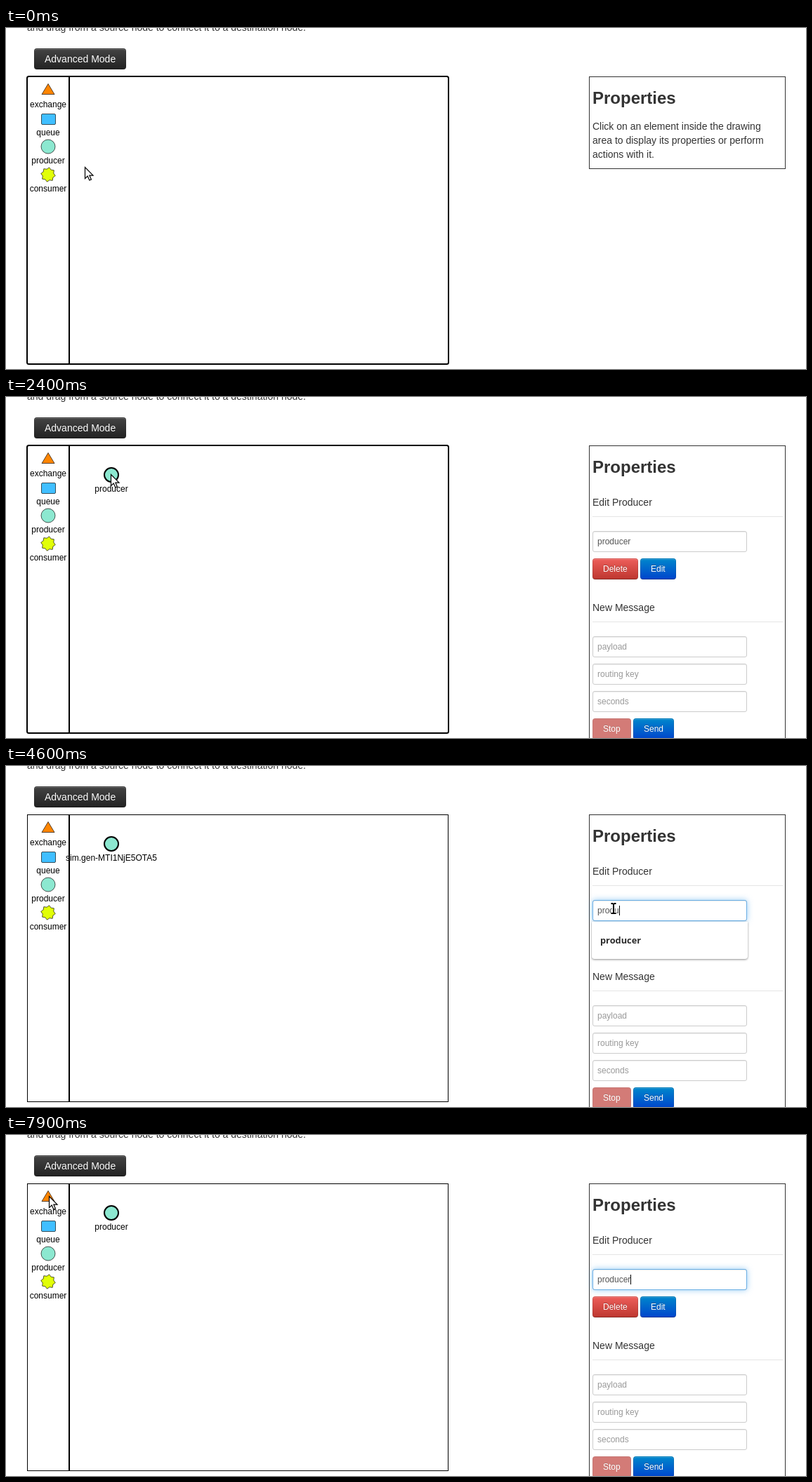
Write an HTML page that moves like this. It is 1139x486 px and loops after 8000 ms.

```html
<!DOCTYPE html>
<html lang="en">
<head>
<meta charset="utf-8">
<title>Message simulator</title>
<style>
html, body { margin: 0; width: 100%; height: 100%; overflow: hidden; background: #fff; }
#stage {
  position: relative; width: 1139px; height: 486px; overflow: hidden;
  font: 14px/20px "Liberation Sans", Arial, sans-serif; color: #333;
}
#stage > *, .panel > * { position: absolute; box-sizing: border-box; white-space: nowrap; }
svg { left: 0; top: 0; overflow: visible; }
svg text { font-size: 12px; text-anchor: middle; fill: #000; }
.panel { left: 830px; top: 69px; width: 280px; border: 1px solid #333; }
.panel > * { left: 4px; margin: 0; }
h3 { top: 10px; font: bold 24px/40px "Liberation Sans", Arial, sans-serif; }
.rule { width: 271px; height: 1px; background: #e5e5e5; }
.field {
  width: 220px; height: 30px; padding: 4px 6px; border: 1px solid #ccc; border-radius: 3px;
  background: #fff; box-shadow: inset 0 1px 1px rgba(0,0,0,.075); font-size: 12px; color: #999;
}
#name { color: #555; }
#glow {
  top: 121px; width: 220px; height: 30px; border: 1px solid rgba(82,168,236,.8); border-radius: 3px;
  box-shadow: 0 0 8px rgba(82,168,236,.6);
}
.btn {
  height: 30px; padding: 4px 14px; border: 1px solid; border-radius: 4px; color: #fff; font-size: 12px;
  border-color: rgba(0,0,0,.1) rgba(0,0,0,.1) rgba(0,0,0,.25); text-shadow: 0 -1px 0 rgba(0,0,0,.25);
  background: linear-gradient(var(--a), var(--b)) border-box;
  box-shadow: inset 0 1px 0 rgba(255,255,255,.2), 0 1px 2px rgba(0,0,0,.05);
}
.dark { --a: #444; --b: #222; font-size: 14px; }
.red { --a: #ee5f5b; --b: #bd362f; }
.blue { --a: #08c; --b: #04c; }
.off { --a: #bd362f; --b: #bd362f; opacity: .65; box-shadow: none; }
.picked { display: inline-block; color: #fff; background: #8fb06c; }
#caret { display: inline-block; width: 1px; height: 14px; margin-right: -1px; background: #000; vertical-align: -3px; }
#menu {
  left: 3px; top: 152px; width: 222px; height: 53px; padding: 16px 12px; background: #fff;
  border-radius: 0 0 4px 4px; box-shadow: 0 1px 3px rgba(0,0,0,.45);
  font: bold 12.8px/20px "Open Sans", "Noto Sans", sans-serif; color: #2b2b2b;
}
</style>
</head>
<body>
<div id="stage">
  <div style="left:30px;top:-11px">and drag from a source node to connect it to a destination node.</div>
  <div class="btn dark" style="left:40px;top:29px">Advanced Mode</div>

  <svg width="1139" height="486">
    <rect x="30.5" y="69.5" width="599" height="409" fill="none" stroke="#000"/>
    <rect id="ring" x="30" y="69" width="600" height="410" rx="2.5" fill="none" stroke="#000" stroke-width="2"/>
    <path d="M90 70V478" stroke="#000" stroke-width="2"/>
    <g stroke="#000" stroke-opacity=".65">
      <path d="M60 79.5L69 94.5H51Z" fill="#ff8500"/>
      <rect x="50.5" y="122.5" width="20" height="15" rx="1.5" fill="#40bfff"/>
      <circle cx="60" cy="169" r="10" fill="#8ce8d0"/>
      <path id="star" fill="#e1ff08" stroke-linejoin="round"/>
    </g>
    <text x="60" y="113">exchange</text>
    <text x="60" y="153">queue</text>
    <text x="60" y="193">producer</text>
    <text x="60" y="233">consumer</text>
    <g id="node">
      <circle r="10" fill="#8ce8d0" stroke="#000" stroke-width="2"/>
      <text id="label" y="24"></text>
    </g>
  </svg>

  <div class="panel" id="hint" style="height:132px">
    <h3>Properties</h3>
    <p style="top:60px">Click on an element inside the drawing<br>area to display its properties or perform<br>actions with it.</p>
  </div>

  <div class="panel" id="form" style="height:500px">
    <h3>Properties</h3>
    <div style="top:70px">Edit Producer</div>
    <div class="rule" style="top:100px"></div>
    <div class="field" id="name" style="top:121px"><span id="value"></span><i id="caret"></i></div>
    <div id="glow"></div>
    <svg id="wave" width="1" height="1"><path fill="none" stroke="#e02020"/></svg>
    <div class="btn red" style="top:160px">Delete</div>
    <div class="btn blue" style="left:72px;top:160px">Edit</div>
    <div style="top:220px">New Message</div>
    <div class="rule" style="top:250px"></div>
    <div class="field" style="top:271px">payload</div>
    <div class="field" style="top:310px">routing key</div>
    <div class="field" style="top:349px">seconds</div>
    <div class="btn off" style="top:388px">Stop</div>
    <div class="btn blue" style="left:62px;top:388px">Send</div>
    <div id="menu">producer</div>
  </div>

  <svg width="1139" height="486">
    <path id="arrow" d="M.5 .5V16.5L4.2 13L6.8 19L9.4 17.9L6.9 12.1H12Z" fill="#fff" stroke="#000" stroke-width="1.2"/>
    <g id="beam" fill="none">
      <path d="M-3.5 -7H-1.5L0 -6L1.5 -7H3.5M0 -6V6M-3.5 7H-1.5L0 6L1.5 7H3.5" stroke="#fff" stroke-width="4"/>
      <path d="M-3.5 -7H-1.5L0 -6L1.5 -7H3.5M0 -6V6M-3.5 7H-1.5L0 6L1.5 7H3.5" stroke="#000" stroke-width="2"/>
    </g>
  </svg>
</div>

<script>
const $ = id => document.getElementById(id);
const LOOP = 8000, TICK = 100;
const WORD = "producer", AUTO = "sim.gen-MTI1NjE5OTA5";

// Pointer legs: first tick, last tick, end point
const legs = [
  [300, 400, 110, 196],
  [600, 1400, 62, 169],
  [1700, 2400, 149, 110],
  [2600, 3400, 862, 214],
  [3500, 3500, 865, 203],
  [6000, 6000, 865, 204],
  [6100, 6800, 195, 192],
  [6900, 7200, 63, 165],
  [7400, 7900, 61, 87]
];
const keys = [4100, 4200, 4400, 4500, 4600, 4700, 4900, 5000];

const ease = p => p * p * (3 - 2 * p);
const within = (t, a, b) => t >= a && t < b;
const show = (id, on) => { $(id).style.display = on ? "" : "none"; };
const place = (id, x, y) => $(id).setAttribute("transform", `translate(${x} ${y})`);

function pointer(t) {
  let x = 112, y = 198;
  for (const [a, b, ex, ey] of legs) {
    if (t < a) break;
    const p = ease(Math.min(1, (t - a + TICK) / (b - a + TICK)));
    x += (ex - x) * p;
    y += (ey - y) * p;
  }
  return [Math.round(x), Math.round(y)];
}

function draw(t) {
  const [x, y] = pointer(t);
  const beam = t >= 3500 && x > 834;
  show("beam", beam);
  show("arrow", !beam);
  place(beam ? "beam" : "arrow", x, y);

  show("node", within(t, 1700, 2400) ? x > 88 : t >= 2400);
  if (t < 2400) place("node", x + 1, y + 1);
  else place("node", 150, 111);
  $("label").textContent = within(t, 2600, 6100) ? AUTO : WORD;

  show("ring", t < 3400);
  show("hint", t < 2400);
  show("form", t >= 2400);
  $("glow").style.opacity = Math.max(0, Math.min(1, (t - 3300) / 300));

  const picked = within(t, 3500, 4100);
  const typed = keys.filter(k => k <= t).length;
  $("value").textContent = t < 2600 ? WORD : t < 4100 ? AUTO : WORD.slice(0, typed);
  $("value").className = picked ? "picked" : "";
  show("wave", picked);
  show("menu", within(t, 4300, 5100));
  show("caret", within(t, 4100, 5600) || within(t, 6200, 6800) || t >= 7400);
}

const points = Array.from({ length: 16 }, (_, i) => {
  const a = i * Math.PI / 8 + .15, r = i % 2 ? 8 : 10.4;
  return (60 + r * Math.sin(a)).toFixed(2) + " " + (209 - r * Math.cos(a)).toFixed(2);
});
$("star").setAttribute("d", "M" + points.join("L") + "Z");

let wave = "M53 143";
for (let i = 1; i <= 41; i++) wave += `L${53 + i * 2} ${i % 2 ? 141.5 : 143}`;
$("wave").firstElementChild.setAttribute("d", wave);
$("wave").style.left = 0;

const start = performance.now();
function frame() {
  const t = (performance.now() - start) % LOOP;
  draw(Math.floor(t / TICK) * TICK);
  requestAnimationFrame(frame);
}
frame();
</script>
</body>
</html>
```
